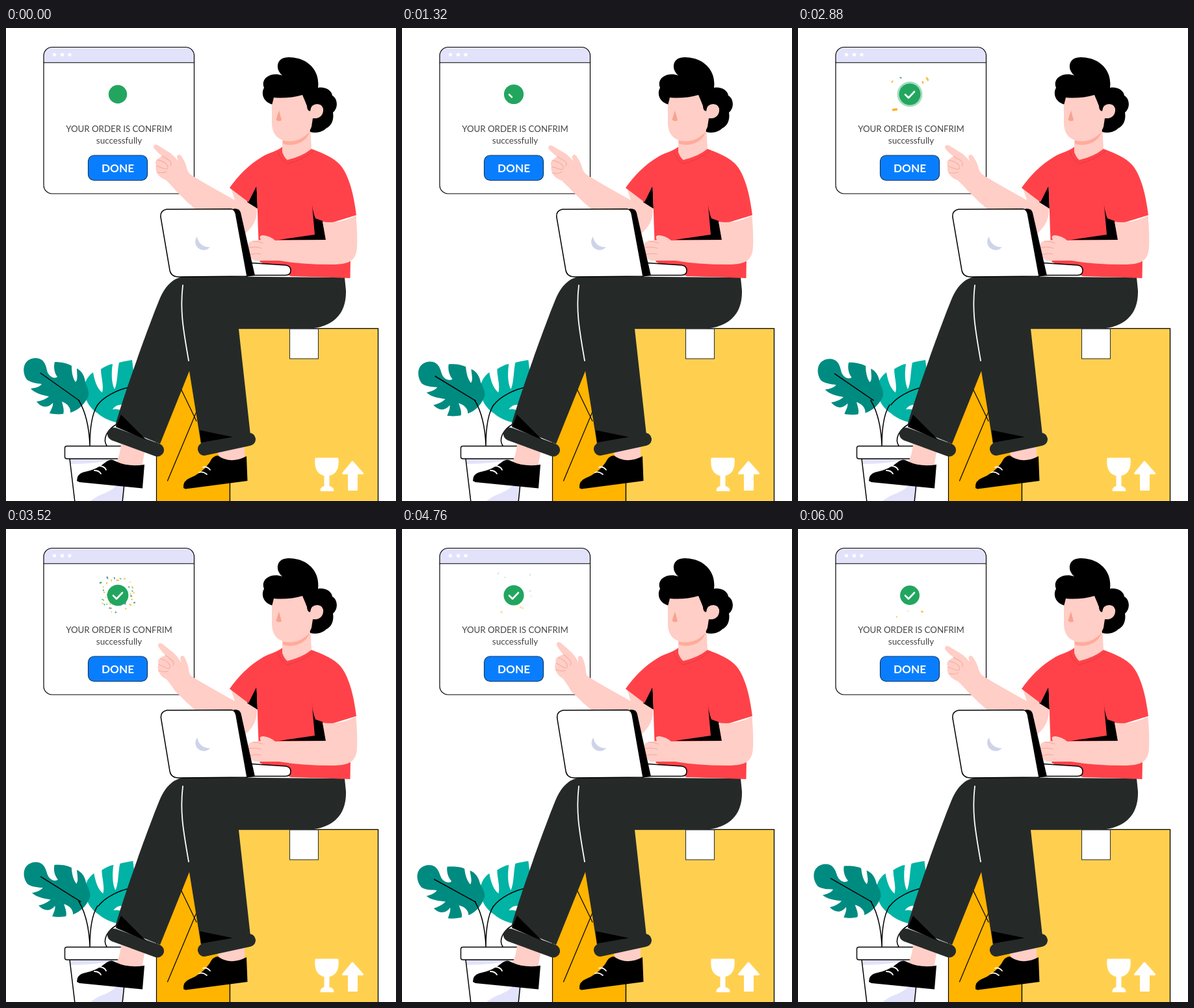
Write an HTML page that moves like this. It is 600x728 px and loops after 6.04 s.

```html
<!DOCTYPE html>
<html lang="en">
<head>
<meta charset="utf-8">
<title>Order confirmed</title>
<style>
html, body { margin: 0; width: 100%; height: 100%; overflow: hidden; background: #fff; }
svg { display: block; width: 600px; height: 728px; }
text { font-family: Lato, "Open Sans", sans-serif; text-anchor: middle; }
.line { fill: none; stroke: #000; stroke-width: 1.5; stroke-linecap: round; stroke-linejoin: round; }
.crease { fill: none; stroke: #f3a89c; stroke-width: 1; stroke-linecap: round; }
.lace { fill: none; stroke: #fff; stroke-width: 1.8; stroke-linecap: round; }
.skin { fill: #ffcec6; }
.red { fill: #ff4249; }
.dark { fill: #252a29; }
.cuff { fill: none; stroke: #252a29; stroke-width: 20; stroke-linecap: round; }
.lilac { fill: #e2e3fb; }
</style>
</head>
<body>
<svg viewBox="0 0 600 728">
  <!-- window -->
  <rect x="58" y="29.5" width="231.5" height="225.5" rx="13" fill="#fff"/>
  <path class="lilac" d="M58 53 V42 Q58 29.5 71 29.5 H276 Q289.5 29.5 289.5 42 V53Z"/>
  <path class="line" style="stroke-width:1" d="M58 53.3 H289.5"/>
  <rect class="line" style="stroke-width:1.2" x="58" y="29.5" width="231.5" height="225.5" rx="13"/>
  <g fill="#fff"><circle cx="74.5" cy="41" r="2.6"/><circle cx="86.5" cy="41" r="2.6"/><circle cx="98" cy="41" r="2.6"/></g>
  <g id="confetti"></g>
  <circle id="ring" cx="172" cy="102" r="15" fill="#22a861"/>
  <circle id="badge" cx="172" cy="102" r="15" fill="#22a65f"/>
  <path id="tick" d="M165 102.5 L170 107.5 L179 98" fill="none" stroke="#fff" stroke-width="2.6" stroke-linecap="round" stroke-linejoin="round" pathLength="1" stroke-dasharray="1 2"/>
  <text x="174" y="159.5" font-size="13.25" fill="#454545">YOUR ORDER IS CONFRIM</text>
  <text x="174" y="178" font-size="13.5" fill="#454545">successfully</text>
  <rect x="126.5" y="196" width="91" height="38.5" rx="9" fill="#087eff" stroke="#16365f" stroke-width="1.2"/>
  <text x="172" y="222" font-size="17.2" font-weight="700" fill="#fff">DONE</text>

  <!-- plant -->
  <path class="line" d="M155 643 C148 632 156 618 170 610"/>
  <g id="leafB">
    <path fill="#00b3a5" d="M121 562 C118 549 124 537 134 530 C136 542 140 555 148 561 C151 551 146 537 146 525 C152 521 158 518 164 517 C162 530 162 546 167 556 C172 546 171 528 174 515 C180 513 188 512 194 511 L200 560 L186 590 L176 608 C166 607 151 602 141 593 C130 586 122 574 121 562Z"/>
    <path fill="#fff" d="M164 587 Q171 577 184 581 L181 590 Q171 585 164 587Z"/>
    <path class="line" d="M190 553 C172 556 150 568 141 580"/>
  </g>
  <g id="leafA">
    <path fill="#008b81" d="M32 541 C24 530 25 509 45 508 C57 508 61 516 63 527 C65 536 74 541 79 537 C74 530 73 521 75 514 C84 514 95 516 101 520 C101 528 102 538 107 545 C111 541 109 532 109 524 C117 528 121 536 122 545 C125 553 128 559 127 566 C122 578 112 588 99 592 C100 584 94 578 86 575 C88 583 90 589 88 594 C80 595 71 594 67 593 C69 588 73 582 72 577 C64 586 54 584 47 575 C54 574 62 571 66 567 C56 565 44 562 38 555 C46 554 52 552 55 548 C48 547 38 546 32 541Z"/>
    <path class="line" d="M53 531 L112 573"/>
  </g>
  <path class="line" d="M112 573 C122 590 128 615 129 643 C129 615 133 592 141 580"/>
  <path d="M98 663 L106 730 H180 L186 663Z" fill="#fff"/>
  <path class="lilac" d="M98 663 H172 Q140 671 99.5 671Z M130 728 Q140 720 152 716 Q168 709 173 700 H183 L180 728Z"/>
  <path class="line" d="M98 663 L106 730 M186 663 L179 730"/>
  <rect x="90.5" y="643.5" width="92" height="19.5" rx="3" fill="#fff" stroke="#000" stroke-width="1.4"/>

  <!-- boxes -->
  <rect x="231.5" y="500" width="113" height="230" fill="#ffb400" stroke="#000" stroke-width="1.2"/>
  <path class="line" style="stroke-width:1.2" d="M248.500 697 L295 586 M268 553 L293 605"/>
  <rect x="344.500" y="462.500" width="228" height="268" fill="#ffd050" stroke="#000" stroke-width="1.3"/>
  <rect x="436.500" y="463" width="44" height="46" fill="#fff" stroke="#333" stroke-width="1.1"/>
  <g fill="#fff" stroke="#fff" stroke-width="3" stroke-linejoin="round">
    <path d="M477 663 H510 Q512 685 496 688 V706 Q503 708 503 711.500 H485 Q485 708 491 706 V688 Q475 685 477 663Z"/>
    <path d="M533 668 L518.500 685.500 H527.500 V710.500 H539.500 V685.500 H548.500Z"/>
  </g>

  <!-- pointing arm -->
  <path class="skin" d="M346 246 L387 255 L386 283 Q385 303 366 318 L340 300 L293 280 Q278 268 265 254 Q252 243 258 232 Q268 216 283 225 Q300 236 320 247 L352 265Z"/>

  <!-- legs -->
  <path class="skin" d="M177 640 Q176 655 170 668 L190 680 L209 676 L214 648Z M324 650 Q330 663 328 668 L348 674 L367 664 V645Z"/>
  <path class="dark" d="M286 382 C262 380 246 393 236 418 C222 452 184 556 168 612 L237 640 L282 528 L300 640 L376 626 L358 463 H462 C503 462 524 440 523 404 L521 384 Z"/>
  <path class="cuff" d="M166 625 L233 649.500 M305 648 L374 633"/>
  <path d="M177 595 L216 634 L169 614Z M298 619 L349 629.500 L300 638Z"/>
  <path d="M272 396 C267 438 274 470 281 512" fill="none" stroke="#fff" stroke-width="1.8" stroke-linecap="round"/>
  <path d="M109 697 Q109 687 118 684 Q140 680 155 667 Q162 662 169 667 Q188 676 213 672 L210 708.500 L113 699Z"/>
  <path class="lace" d="M136 681 Q143 681 146 686 M143 674 Q151 674 154 680"/>
  <path d="M273 708 Q272 697 282 693 Q302 685 313 669 Q318 658 326 658 Q345 672 370 659 L371.500 697 L276 709.500Z"/>
  <path class="lace" d="M297 684 Q303 682 309 687 M303 676 Q309 674 314 680"/>

  <!-- torso -->
  <path d="M385.500 242 L371 268 L387 278Z"/>
  <path class="red" d="M425 183 C418 189 405 192 396 197 C372 211 357 228 344 246 L373 268 L385.500 243 L387 282 Q388 325 390.500 360 L438 382 L529.500 385 L530 355 L500 300 L539 288 C535 258 530 237 520 219 C510 201 490 194 470 186Z"/>
  <path d="M470 262 Q471 281 476 293 L487 297 L492 326 H420 L475 318Z"/>
  <path class="skin" d="M487 298 Q512 302 538.500 289 Q541 320 540 337 C539 359 527 364 501 364 Q455 364 420 358 L383 358 Q376 355 375 349 Q370 344 373 338 Q371 329 379 328 L392 326 Q388 319 396 319 Q406 320 414 327 L492 326Z"/>
  <path class="crease" d="M379 328 Q388 328 395 331 M373 338 Q385 336 393 339 M375 349 Q385 346 392 348"/>

  <!-- head -->
  <path class="skin" d="M425 165 V191 Q429 201 433 203 Q455 198 470 186 L468 150Z"/>
  <path d="M426 173 Q450 177 467 160 Q461 178 438 180 Q431 180 426 178Z" fill="#ffab9b"/>
  <path fill="none" stroke="#e2383f" d="M418 190 Q422 202 432 209 Q455 204 475 188"/>
  <path d="M418 57 C420 44 434 43 450 47 C468 52 483 68 480 92 C491 90 501 96 502 104 C511 109 511 124 503 130 C505 142 500 151 493 154 C486 161 477 162 468 160 L463 126 L456 104 L412 118 C398 116 391 103 397 92 C391 78 407 67 425 73 Q417 66 418 57Z"/>
  <path class="skin" d="M412 107 Q435 109 456 103 Q460 112 463 120 Q463 127 468 128 Q469 117 479 117 Q489 118 488 128 Q486 140 472 139 L470 152 C464 169 446 176 431 174 C415 171 409 160 409 145 V119Z"/>
  <path d="M420 127 L415.500 141 Q419 145 424 142Z" fill="#f9a28f"/>

  <!-- laptop -->
  <path d="M376 361.500 L430 365 Q438 366 438 373 Q438 380.500 430 380.500 H376Z" fill="#fff" stroke="#000" stroke-width="1.5"/>
  <g id="lid">
    <path d="M350 278 Q359 277 361 284 L383 381 L368 383Z"/>
    <path d="M247 279 L346 278.500 Q352 279 353.500 286 L371 382 L266 383 Q254 383 252 373 L238 291 Q237 281 247 279Z" fill="#fff" stroke="#000" stroke-width="1.5"/>
    <path d="M294 321 A12.500 12.500 0 0 0 314 337 A18 18 0 0 1 294 321Z" fill="#cfd3ea"/>
  </g>

  <!-- pointing hand -->
  <g id="hand">
    <path class="skin" d="M227 184 Q227 178 233 180 L252 192 Q259 197 265 205 L263 199 Q264 193 269 196 Q276 206 278 215 Q279 221 284 226 L286 240 Q278 258 264 253 Q254 242 246 234 Q235 230 232 222 Q229 217 231 212 Q228 205 233 202 Q236 199 240 197 Q231 190 227 184Z"/>
    <path class="crease" d="M240 197 L250 203 Q256 207 253 212 M233 203 Q244 205 248 211 Q251 218 245 217 L231 212 M232 222 Q242 224 247 221"/>
  </g>
</svg>
<script>
const LOOP = 6040;
const NS = "http://www.w3.org/2000/svg";
const $ = id => document.getElementById(id);
const set = (el, attrs) => { for (const k in attrs) el.setAttribute(k, attrs[k]); };
const clamp = v => Math.max(0, Math.min(1, v));
const ramp = (t, a, b) => clamp((t - a) / (b - a));
const smooth = p => p * p * (3 - 2 * p);

// Rows: time, hand turn, leaf turn, leaf shift, badge radius.
const poses = [
  [0, 0, 0, 0, 14.2],
  [760, -11.4, -2.5, 0, 15],
  [1920, 8.8, -5.8, 1.5, 15.2],
  [2880, -1, -1, 4, 16.5],
  [4160, 13.7, -5.8, 1.5, 16.2],
  [5360, 5.9, -7.5, 0, 15],
  [6040, -1, -5.6, 1, 15]
];

function poseAt(t) {
  const i = poses.findIndex((p, k) => k && p[0] >= t);
  const a = poses[i - 1], b = poses[i];
  const k = smooth(ramp(t, a[0], b[0]));
  return a.map((v, n) => v + (b[n] - v) * k);
}

let seed = 11;
const rand = () => (seed = (seed * 16807) % 2147483647) / 2147483647;
const colors = ["#fbb11b", "#23a862", "#f6c544", "#4f9aa0"];

// x, y, colour, start, end, width, height
const specks = [
  [149, 126, 0, 2660, 3300, 8, 3.4], [199, 79, 2, 2660, 3300, 6, 3],
  [145, 83, 2, 2700, 3300, 4, 2], [158, 77, 3, 2700, 3300, 3, 2], [192, 84, 0, 2700, 3300, 4, 2],
  [148, 70, 3, 4700, 5600, 4, 1.4], [158, 76, 1, 4700, 5600, 3, 1.2],
  [197, 72, 3, 4700, 5600, 4, 1.2], [197, 97, 3, 4700, 5600, 4, 1.2],
  [184, 123, 0, 4700, 5800, 7, 3], [153, 130, 0, 4700, 5800, 4, 3.4],
  [191, 127, 0, 5700, 6200, 4, 2.4], [152, 135, 0, 5700, 6200, 3, 1.4], [169, 126, 2, 5700, 6200, 2, 1]
].map(([x, y, c, start, end, w, h], i) => ({ x, y, c, start, end, w, h, turn: i * 67 }));

for (let i = 0; i < 38; i++) {
  const angle = i * 2.4, reach = 0.72 + rand() * 0.28;
  specks.push({
    x: 170 + Math.cos(angle) * 36 * reach, y: 100 + Math.sin(angle) * 33 * reach,
    c: i % 4, start: 2900 + rand() * 500, end: 4300 + rand() * 500,
    w: 1.5 + rand() * 3, h: 1.2 + rand(), turn: rand() * 360, burst: true
  });
}
for (const s of specks) {
  s.el = document.createElementNS(NS, "rect");
  set(s.el, { x: -s.w / 2, y: -s.h / 2, width: s.w, height: s.h, rx: s.h / 3, fill: colors[s.c] });
  $("confetti").append(s.el);
}

function drawSpeck(s, t) {
  const out = s.burst ? 1 - (1 - ramp(t, s.start, 4000)) ** 3 : 1;
  const mid = (s.start + s.end) / 2;
  const fall = s.burst ? 0 : (t - mid) * 0.004;
  const x = 172 + (s.x - 172) * out, y = 102 + (s.y - 102) * out + fall;
  const turn = s.turn + (t - mid) * 0.08;
  set(s.el, {
    transform: `translate(${x} ${y}) rotate(${turn})`,
    opacity: ramp(t, s.start, s.start + 180) * (1 - ramp(t, s.end - 250, s.end))
  });
}

function draw(t) {
  const [, hand, leaf, shift, radius] = poseAt(t);
  set($("hand"), { transform: `rotate(${hand} 268 243)` });
  set($("lid"), { transform: `translate(0 383) skewX(${-hand * 0.045}) translate(0 -383)` });
  set($("leafA"), { transform: `translate(${shift} 0) rotate(${leaf} 122 570)` });
  set($("leafB"), { transform: `translate(${shift / 2} 0)` });
  set($("badge"), { r: radius });
  set($("ring"), {
    r: 15 + 5 * smooth(ramp(t, 2600, 2950)),
    opacity: 0.4 * ramp(t, 2600, 2700) * (1 - ramp(t, 3000, 3400))
  });
  const drawn = smooth(ramp(t, 1200, 1550));
  set($("tick"), { "stroke-dashoffset": 1 - drawn, opacity: drawn > 0 ? 1 : 0 });
  specks.forEach(s => drawSpeck(s, t));
}

const begin = performance.now();
function tick() {
  draw((performance.now() - begin) % LOOP);
  requestAnimationFrame(tick);
}
tick();
</script>
</body>
</html>
```
